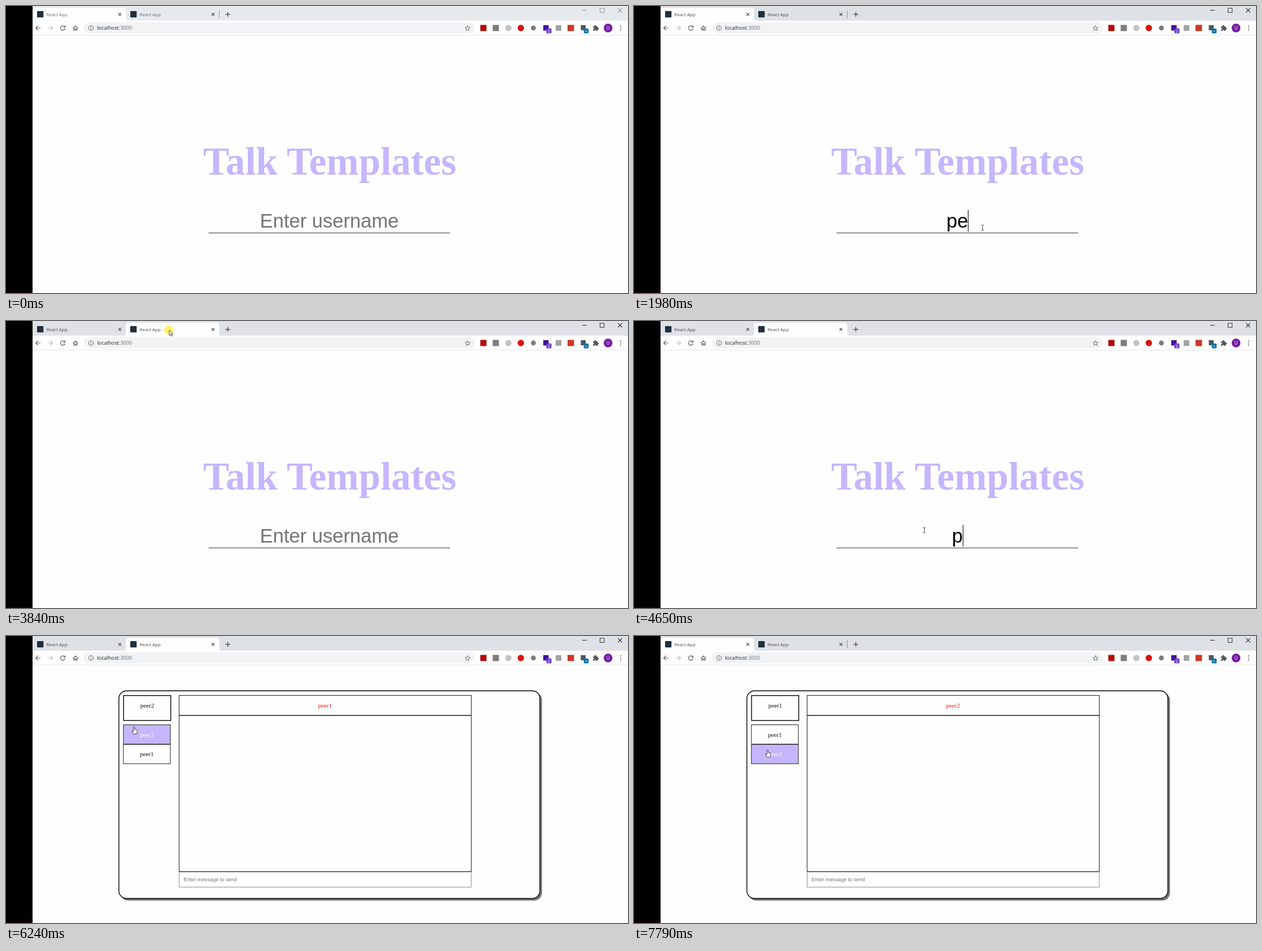
Write an HTML page that moves like this. It is 1101 px wide and 509 px high and loops after 7990 ms.

```html
<!DOCTYPE html>
<html lang="en">
<head>
<meta charset="utf-8">
<title>Chat demo</title>
<style>
  html, body { margin: 0; width: 100%; height: 100%; overflow: hidden; background: #fefefe; }
  svg { display: block; width: 100vw; height: 100vh; }
  .ui { font-family: "Open Sans", "Noto Sans", sans-serif; }
  .serif { font: 11.06px "Liberation Serif", "Times New Roman", serif; text-anchor: middle; }
  .sans { font-family: "Liberation Sans", Arial, sans-serif; }
  .title { font-size: 69px; font-weight: bold; fill: #c5b6ff; }
  .field { font-size: 34.55px; text-anchor: middle; }
  .line { fill: none; stroke: #5f6368; stroke-width: 1.2; }
</style>
</head>
<body>
<svg viewBox="0 0 1101 509" preserveAspectRatio="none">
  <rect width="1101" height="509" fill="#fefefe"/>
  <g id="page"></g>
  <g id="tabs"></g>

  <g id="toolbar">
    <path d="M47 26H1101V51H47z" fill="#fefefe"/>
    <path d="M47 51.5H1101" stroke="#e3e5e8"/>
    <rect x="138" y="29" width="692" height="19.5" rx="9.75" fill="#f1f3f4"/>
    <g class="line">
      <path d="M61 39H53M56.6 35L52.6 39L56.6 43"/>
      <path d="M74 39H82M78.4 35L82.4 39L78.4 43" stroke="#b9bcc0"/>
      <path d="M103.7 36.6A4 4 0 1 0 104.4 40M104.6 34.6V37.6H101.5"/>
      <path d="M118.6 39.4L123 35.3L127.4 39.4M120 38.6V43H122V40.4H124V43H126V38.6"/>
      <circle cx="150.5" cy="39" r="4.1" stroke-width="1"/>
      <path d="M150.5 38.5V41.4M150.5 36.6V37.6" stroke-width="1"/>
      <path d="M817 34.7L818.3 37.8L821.5 38L819 40.1L819.8 43.3L817 41.5L814.2 43.3L815 40.1L812.5 38L815.7 37.8z" stroke-width=".9"/>
    </g>
    <text class="ui" x="161.3" y="42.3" font-size="9.2" fill="#202124">localhost<tspan fill="#6b6f74">:3000</tspan></text>
    <rect x="839.5" y="33.5" width="11" height="11" rx="1" fill="#b30b0b"/>
    <rect x="861.5" y="33.5" width="11" height="11" fill="#7d7d7d"/>
    <circle cx="889.3" cy="39" r="5.5" fill="#c3c3c3"/>
    <circle cx="911.3" cy="39" r="5.7" fill="#d9130d"/>
    <circle cx="933.5" cy="39" r="4.4" fill="#7b7b7b"/>
    <rect x="951" y="34" width="9.5" height="9.5" fill="#42129e"/>
    <rect x="956.5" y="39.8" width="9" height="8.7" rx="1.5" fill="#6b3fc4"/>
    <text class="ui" x="961" y="47" font-size="7.5" fill="#fff" text-anchor="middle">2</text>
    <rect x="973" y="34" width="10" height="10" fill="#a3a3a3"/>
    <rect x="994" y="33.5" width="11.5" height="11" fill="#c83a28"/>
    <rect x="1017.5" y="34" width="8.5" height="9" fill="#4a555e"/>
    <rect x="1022.7" y="40" width="8.6" height="8.5" rx="1.5" fill="#1274a8"/>
    <path d="M1025.7 44.7H1028.3" stroke="#fff"/>
    <path d="M1039 36.2H1041.6A1.7 1.7 0 1 1 1044.9 36.2H1047.2V38.4A1.7 1.7 0 1 1 1047.2 41.7V44H1044.6A1.5 1.5 0 1 0 1041.6 44H1039V41.5A1.5 1.5 0 1 0 1039 38.6z" fill="#53575b"/>
    <circle cx="1065.7" cy="39" r="7.7" fill="#7519a2"/>
    <text class="ui" x="1065.7" y="42" font-size="8.2" fill="#fff" text-anchor="middle">U</text>
    <path d="M1088 35.2v.1M1088 38.9v.1M1088 42.6v.1" stroke="#5f6368" stroke-width="2" stroke-linecap="round"/>
  </g>

  <rect width="47" height="509" fill="#000"/>
  <path d="M0 508.5H47" stroke="#2a0505"/>

  <circle id="ring" r="8.3" fill="#fff16b" opacity=".92"/>
  <g id="arrow"><path d="M0 0V9.6L2.2 7.6L3.7 11L5.2 10.3L3.8 7.1H6.6z" fill="#fff" stroke="#333" stroke-width=".9"/></g>
  <g id="beam"><path d="M-2.4 -4.4H-.6L0 -3.8L.6 -4.4H2.4M-2.4 4.4H-.6L0 3.8L.6 4.4H2.4M0 -3.8V3.8" fill="none" stroke="#333" stroke-width=".9"/></g>
  <g id="hand"><path d="M-1.1 .8Q0 -.7 1 .8V4.6L2.8 5Q5.8 5.4 5.7 7.4L5 10.8L4.2 13H-.9Q-2.3 10.9 -4 8.6Q-4 6.8 -2.3 7.6L-1.1 8.8z" fill="#fff" stroke="#222" stroke-width=".9"/></g>
</svg>

<script>
const LOOP = 7990;
const $ = id => document.getElementById(id);
const NAMES = ['peer1', 'peer2'];

// time, x, y, ease-out power of the move that ends here
const PATH = [
  [0, 640, 516, 1], [70, 640, 514, 1], [490, 617, 393, 2],
  [2860, 617, 393, 1], [3110, 410, 127, 1], [3660, 289, 16, 3],
  [3880, 289, 16, 1], [4170, 514, 371, 2],
  [5570, 514, 371, 1], [5850, 232, 205, 2],
  [6195, 232, 205, 1], [6240, 227.5, 162, 1], [6480, 130, 17, 2],
  [6630, 130, 17, 1], [6975, 230, 184, 2],
  [7250, 230, 184, 1], [7360, 236.5, 202, 2]
];
const CLICKS = [[500, 630], [3690, 3880], [4170, 4290], [5850, 5980], [6490, 6620], [7660, 7790]];
const ACTIVE = 500;
const TO_SECOND = 3690, TO_FIRST = 6530;

// per tab: focus, key times, sign-in, chat opening, list of [time, names]
const TABS = [
  { focus: 500, keys: [990, 1850, 2080, 2180, 2350], enter: 2625, chat: 7720, other: 'peer2',
    lists: [[2870, ['peer1']], [5300, ['peer1', 'peer2']]] },
  { focus: 4190, keys: [4620, 4720, 4820, 4890, 5120], enter: 5288, chat: 5930, other: 'peer1',
    lists: [[5580, ['peer2', 'peer1']]] }
];

function pointer(t) {
  const i = PATH.findIndex(k => k[0] > t);
  if (i < 0) return PATH[PATH.length - 1].slice(1, 3);
  const a = PATH[i - 1], b = PATH[i];
  const p = 1 - Math.pow(1 - (t - a[0]) / (b[0] - a[0]), b[3]);
  return [a[1] + (b[1] - a[1]) * p, a[2] + (b[2] - a[2]) * p];
}

const text = (cls, x, y, s, fill = '#111') =>
  `<text class="${cls}" x="${x}" y="${y}" fill="${fill}">${s}</text>`;
const box = (x1, y1, x2, y2, stroke = '#1a1a1a', w = 1, fill = 'none', r = 0) =>
  `<rect x="${x1}" y="${y1}" width="${x2 - x1}" height="${y2 - y1}" rx="${r}" fill="${fill}" stroke="${stroke}" stroke-width="${w}"/>`;
const cross = (x, y, r, color) =>
  `<path d="M${x - r} ${y - r}l${2 * r} ${2 * r}m0 ${-2 * r}l${-2 * r} ${2 * r}" stroke="${color}" stroke-width="1.1"/>`;

function tabStrip(current, active) {
  const ink = active ? '#45494d' : '#66707a';
  const win = active ? '#222' : '#8c8f92';
  const x0 = current ? 212 : 47, x1 = x0 + 165.5;
  let s = `<path d="M47 0H1101V26H47z" fill="${active ? '#dee1e6' : '#e7eaed'}"/>` +
    `<path d="M${x0 - 4} 26Q${x0} 26 ${x0} 22V8Q${x0} 3 ${x0 + 5} 3H${x1 - 5}Q${x1} 3 ${x1} 8V22Q${x1} 26 ${x1 + 4} 26z" fill="#fefefe"/>`;
  for (const x of [55, 220]) {
    s += `<rect x="${x}" y="9" width="11.3" height="11.3" rx="1" fill="#1f2f3b"/>` +
      `<text class="ui" x="${x + 16.6}" y="17.8" font-size="7.95" fill="${ink}">React App</text>` +
      cross(x + 146.4, 14.8, 2.5, '#3c4043');
  }
  if (!current) s += '<path d="M377.5 8V22" stroke="#92969b"/>';
  return s + '<path d="M388.2 14.8H397M392.6 10.4V19.2" stroke="#3c4043" stroke-width="1.2"/>' +
    `<path d="M1020 7.5H1028" stroke="${win}"/>` +
    box(1051.5, 4, 1058.8, 11.3, win, 0.9) + cross(1087, 7.6, 3.7, win);
}

function login(tab, t) {
  const typed = tab.keys.filter(k => k <= t).length;
  const word = NAMES[TABS.indexOf(tab)].slice(0, typed);
  const last = typed ? tab.keys[typed - 1] : tab.focus;
  const caret = t >= last && (t - last) % 1000 < 500;
  return text('serif title', 573, 298.5, 'Talk Templates', '#c5b6ff') +
    (word ? text('sans field', 572.3, 393.3, word, '#000')
          : text('sans field', 572.3, 393.3, 'Enter username', '#757575')) +
    '<path d="M358.5 402.5H786" stroke="#333"/>' +
    (caret ? `<path id="caret" d="M572.5 361.5V400" stroke="#000"/>` : '');
}

function panel(me, list, hover, other) {
  let s = '<rect x="202.5" y="100" width="746.2" height="369.3" rx="14" fill="#757575"/>' +
    box(199.8, 97.2, 945, 465.5, '#000', 1.4, '#fefefe', 13.5) +
    box(208.1, 105.6, 291.6, 149.8, '#000', 1.4) +
    text('serif', 250, 126.6, me);
  list.forEach((name, i) => {
    const y = 157.5 + i * 34.8;
    s += box(207.8, y, 290.9, y + 34.3, '#222', 1, i === hover ? '#c5b6ff' : '#fefefe') +
      text('serif', 249.2, y + 21, name, i === hover ? '#fff' : '#111');
  });
  if (!other) return s + text('serif', 603, 331, 'Click chat to start messaging');
  return s + box(306.4, 418.2, 823.6, 445.3, '#808080', 0.9) +
    box(306.4, 105.4, 823.6, 140.6) + box(306.4, 141, 823.6, 417.8) +
    text('serif', 564.7, 126.6, other, '#f01515') +
    '<text class="sans" x="314.2" y="434.7" font-size="9.22" fill="#757575">Enter message to send</text>';
}

const cache = {};
function put(id, html) {
  if (cache[id] === html) return false;
  cache[id] = html;
  $(id).innerHTML = html;
  return true;
}

function show(id, on, x, y) {
  const el = $(id);
  el.style.display = on ? '' : 'none';
  el.setAttribute('transform', `translate(${x} ${y})`);
}

function draw(t) {
  const current = t >= TO_SECOND && t < TO_FIRST ? 1 : 0;
  const tab = TABS[current];
  const [x, y] = pointer(t);
  let shape = 'arrow', html;

  if (t < tab.enter) {
    html = login(tab, t);
    if (x > 358 && x < 786 && y > 361 && y < 402) shape = 'beam';
  } else {
    const list = tab.lists.filter(l => l[0] <= t).map(l => l[1]).pop() || [];
    const row = Math.floor((y - 157.5) / 34.8);
    const hover = x > 208 && x < 291 && row >= 0 && row < list.length ? row : -1;
    if (hover >= 0) shape = 'hand';
    html = panel(NAMES[current], list, hover, t >= tab.chat ? tab.other : '');
  }

  put('tabs', tabStrip(current, t >= ACTIVE));
  if (put('page', html) && $('caret')) {
    const field = $('page').querySelector('.field');
    const half = field.textContent === 'Enter username' ? 0 : field.getComputedTextLength() / 2;
    $('caret').setAttribute('transform', `translate(${Math.round(half)} 0)`);
  }
  for (const id of ['arrow', 'beam', 'hand']) show(id, id === shape, x, y);
  show('ring', CLICKS.some(([a, b]) => t >= a && t < b), x - 1, y);
}

const start = performance.now();
function tick() {
  draw((performance.now() - start) % LOOP);
  requestAnimationFrame(tick);
}
tick();
</script>
</body>
</html>
```
